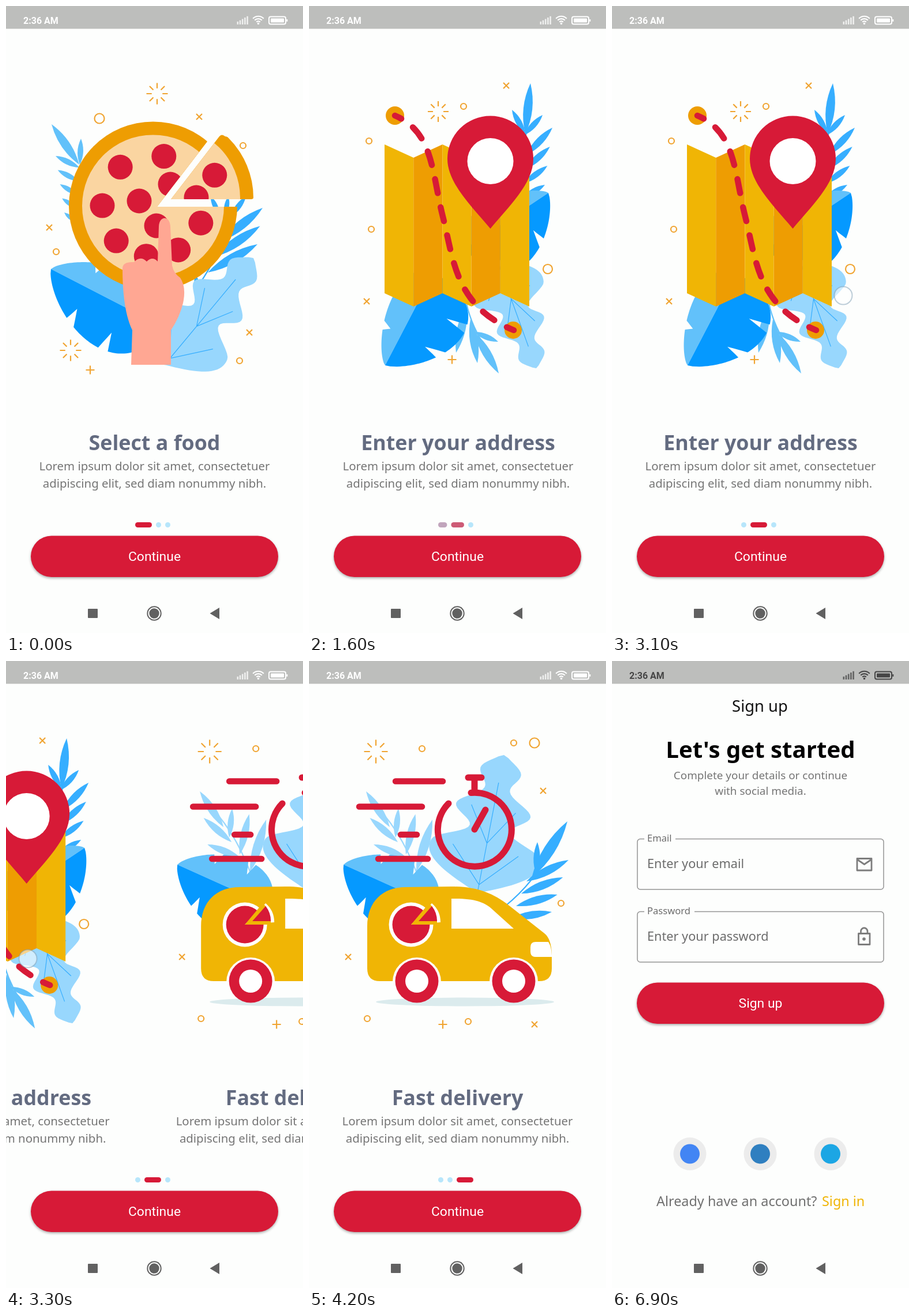
An HTML page for the animation above (7 s loop, 515 by 1087 pixels).

```html
<!DOCTYPE html>
<html lang="en">
<head>
<meta charset="utf-8">
<title>Food ordering onboarding</title>
<style>
html, body { margin: 0; width: 100%; height: 100%; overflow: hidden; background: #fdfefd; }
svg { display: block; width: 100%; height: 100%; font-family: "Noto Sans", sans-serif; }
.ui { font-family: Roboto, sans-serif; }
.btn { filter: drop-shadow(0 2px 2px #0005); }
</style>
</head>
<body>
<svg id="stage" viewBox="0 0 515 1087"></svg>
<script>
const W = 515, MID = 257.5, TAU = Math.PI * 2;
const RED = '#d71a37', YELLOW = '#f0b505', ORANGE = '#ee9d02', CREAM = '#fad5a1', SKIN = '#ffa793';
const PALE = '#98d7fd', LIGHT = '#62c1fa', BLUE = '#36aeff', DEEP = '#0599ff', MARK = '#f0a431', BG = '#fdfefd';

const clamp = v => Math.max(0, Math.min(1, v));
const lerp = (a, b, p) => a + (b - a) * p;
const times = (n, f) => Array.from({ length: n }, (_, i) => f(i));

// Basic shapes
const fill = (d, color) => `<path d="${d}" fill="${color}"/>`;
const stroke = (d, color, w = 2.2, extra = '') =>
  `<path d="${d}" fill="none" stroke="${color}" stroke-width="${w}" stroke-linejoin="round" ${extra}/>`;
const round = (d, w, extra = '') => stroke(d, RED, w, 'stroke-linecap="round" ' + extra);
const disc = (x, y, r, color) => `<circle cx="${x}" cy="${y}" r="${r}" fill="${color}"/>`;
const pill = (x, y, w, h, color, extra = '') =>
  `<rect x="${x}" y="${y}" width="${w}" height="${h}" rx="${h / 2}" fill="${color}" ${extra}/>`;
const text = (s, x, y, size, color, extra = 'text-anchor="middle"') =>
  `<text x="${x}" y="${y}" font-size="${size}" fill="${color}" ${extra}>${s}</text>`;
const heading = (s, y, size, color) => text(s, MID, y, size, color, 'text-anchor="middle" font-weight="700"');

// Small orange marks
const ring = (x, y, r = 5) => stroke(`M${x - r} ${y}a${r} ${r} 0 1 0 ${2 * r} 0a${r} ${r} 0 1 0 ${-2 * r} 0`, MARK);
const cross = (x, y) => stroke(`M${x - 5} ${y - 5}l10 10m0-10l-10 10`, MARK);
const plus = (x, y) => stroke(`M${x - 7.5} ${y}h15m-7.5-7.5v15`, MARK);
const spark = (x, y, r) => stroke(times(8, i => {
  const c = Math.cos(i * TAU / 8), s = Math.sin(i * TAU / 8);
  return `M${x + c * r / 2} ${y + s * r / 2}L${x + c * r} ${y + s * r}`;
}).join(''), MARK);

// Local frame along the line a-b: s runs from 0 to 1, w is the sideways offset
const axis = (a, b) => {
  const dx = b[0] - a[0], dy = b[1] - a[1], len = Math.hypot(dx, dy);
  return { len, at: (s, w) => [a[0] + dx * s - dy / len * w, a[1] + dy * s + dx / len * w] };
};

// Slim leaf given as tip x, y and base x, y
const leaf = ([x1, y1, x2, y2], color) => {
  const { len, at } = axis([x1, y1], [x2, y2]), w = 4 + len * .13;
  return fill(`M${x1} ${y1}Q${at(.5, w)} ${x2} ${y2}Q${at(.5, -w)} ${x1} ${y1}`, color);
};
// Row of slim leaves between the first and the last
const fan = (n, first, last, color) =>
  times(n, i => leaf(first.map((v, k) => lerp(v, last[k], i / (n - 1))), color)).join('');

// One half of a broad leaf, slit at each third
const halfLeaf = (tip, base, width, color) => {
  const { at } = axis(tip, base), n = 72;
  return fill('M' + times(n + 1, i => {
    const s = i / n, slit = Math.max(0, 1 - Math.abs(s * 3 - Math.round(s * 3)) * 8);
    const cut = s > .2 && s < .8 ? 1 - .4 * slit : 1;
    return at(s, width * 2.4 * s ** .75 * (1 - s) ** .45 * cut);
  }).join('L') + 'Z', color);
};
const broadLeaf = (tip, base, dark, light) => halfLeaf(tip, base, light, LIGHT) + halfLeaf(tip, base, dark, DEEP);

// Leaf with three rounded lobes per side, narrowing to the tip
const oakLeaf = (base, tip, wide) => {
  const { len, at } = axis(base, tip), n = 60;
  const half = s => {
    const lobes = s < .32 ? Math.sin(s / .32 * TAU / 4) : .72 + .28 * Math.cos(TAU * (s - .32) / .29);
    const cap = s > .88 ? Math.sqrt(Math.max(0, 1 - ((s - .88) / .12) ** 2)) : 1;
    return len * wide * (.53 - .43 * s) * lobes * cap;
  };
  const side = k => times(n + 1, i => at(i / n, k * half(i / n)));
  const veins = [.06, .36].map(s => `M${at(s + .25, half(s + .25) * .6)}L${at(s, 0)}L${at(s + .25, -half(s + .25) * .6)}`);
  return fill('M' + [...side(1), ...side(-1).reverse()].join('L') + 'Z', PALE)
    + stroke(`M${base}L${at(.8, 0)}` + veins.join(''), BLUE, 1.2);
};

const page = (i, title, art) => `<g transform="translate(${i * W})">${art}
  ${heading(title, 770, 35.8, '#636b80')}
  ${text('Lorem ipsum dolor sit amet, consectetuer', MID, 805, 20.4, '#757575')}
  ${text('adipiscing elit, sed diam nonummy nibh.', MID, 835, 20.4, '#757575')}</g>`;

const button = (y, label) => pill(43, y, 429, 71.5, RED, 'class="btn"')
  + text(label, MID, y + 43.5, 22.9, '#fff', 'text-anchor="middle" class="ui"');

function pizzaArt() {
  const cx = 255, cy = 346.5;
  const outer = times(8, i => {
    const a = (-80 - 45 * i - 10 * Math.sin((i - .3) * TAU / 8)) * TAU / 360;
    return [cx + 88 * Math.cos(a), cy + 88 * Math.sin(a)];
  });
  const pizza = (id, cut, inner) => `<clipPath id="${id}"><path d="${cut}"/></clipPath><g clip-path="url(#${id})">`
    + disc(cx, cy, 146, ORANGE) + disc(cx, cy, 123, CREAM)
    + [...outer, ...inner].map(([x, y]) => disc(x, y, 21.5, RED)).join('') + '</g>';
  return spark(262, 152, 18.5) + spark(112, 597, 18.5)
    + ring(162, 195, 8.5) + ring(411, 242) + ring(87, 426) + ring(405, 615)
    + cross(335, 192) + cross(75, 384) + cross(422, 566) + plus(146, 631)
    + leaf([79, 205, 127, 275], LIGHT) + leaf([130, 230, 128, 275], LIGHT)
    + fan(5, [86, 260, 127, 280], [101, 358, 120, 374], LIGHT)
    + fan(3, [445, 350, 372, 408], [436, 413, 350, 462], BLUE) + fan(3, [355, 330, 370, 362], [416, 330, 390, 365], BLUE)
    + leaf([335, 502, 328, 465], BLUE) + stroke('M395 350Q385 410 330 490', BLUE)
    + broadLeaf([78, 456], [270, 555], 77, -55)
    + oakLeaf([275, 622], [429, 437], .82)
    + pizza('pie', 'M262 348L349 235L300 150H50V550H450L402 348Z', [[231, 338], [261, 381], [285, 309]])
    + `<g transform="translate(28 -14)">${pizza('slice', 'M258 349L342 240Q346 235 352 240L440 260L401 346Q401 349 397 349Z', [[302, 346]])}</g>`
    + fill('M217 622L219 562C206 535 202 495 202 455Q202 443 222 444Q233 432 244 443Q254 433 263 443L265 382C266 363 284 363 285 382L288 450Q291 464 302 471Q313 487 307 515Q301 540 286 562V622Z', SKIN);
}

function mapArt() {
  const panels = times(5, i => {
    const x = 130 + i * 50.2, a = i % 2 * 23, b = 23 - a;
    return fill(`M${x} ${240 + a}l50.2 ${b - a}V${498 + b}l-50.2 ${a - b}Z`, i % 2 ? ORANGE : YELLOW);
  }).join('');
  return spark(223, 183, 18) + ring(267, 174) + ring(103, 234) + ring(107, 387) + ring(413, 456, 8)
    + cross(341, 138) + cross(99, 512) + plus(247, 613)
    + leaf([383, 134, 374, 222], BLUE) + leaf([351, 180, 374, 222], BLUE) + leaf([404, 189, 372, 224], BLUE)
    + fan(4, [421, 211, 376, 258], [408, 310, 370, 332], BLUE) + stroke('M380 160Q374 220 370 330', BLUE)
    + broadLeaf([414, 324], [270, 420], -75, 40)
    + fan(3, [254, 601, 272, 520], [328, 637, 286, 566], LIGHT) + leaf([327, 582, 285, 565], LIGHT)
    + stroke('M272 515Q280 555 310 600', LIGHT)
    + broadLeaf([131, 623], [215, 462], 88, -40)
    + oakLeaf([325, 440], [393, 628], .8)
    + panels + disc(148, 190, 16, ORANGE) + disc(353, 562, 15, ORANGE)
    + round('M148 190C215 218 212 290 231 365S252 520 354 562', 10.5, 'stroke-dasharray="24.7 25" stroke-dashoffset="12.5"')
    + fill('M313.5 386C283 349 239 308 239 265A74.5 74.5 0 0 1 388 265C388 308 344 349 313.5 386Z', RED)
    + disc(313.5, 269, 40, '#fff');
}

function vanArt() {
  const wheel = x => fill(`M${x - 42} 556a42 42 0 0 1 84 0Z`, BG) + disc(x, 555, 37.5, RED) + disc(x, 555, 20, '#fff');
  return spark(116, 157, 20.5) + ring(196, 152) + ring(355, 142) + ring(391, 142, 8.5) + ring(437, 420) + ring(101, 620) + ring(276, 625)
    + cross(406, 225) + cross(68, 513) + cross(391, 630) + plus(232, 630)
    + fan(3, [99, 226, 140, 288], [112, 318, 168, 340], PALE) + fan(3, [155, 256, 150, 306], [214, 275, 186, 365], PALE)
    + stroke('M115 250Q165 300 195 390', PALE)
    + oakLeaf([292, 402], [338, 163], 1)
    + leaf([448, 278, 386, 376], BLUE) + leaf([396, 314, 394, 370], BLUE)
    + fan(4, [450, 345, 377, 382], [421, 435, 350, 446], BLUE) + stroke('M425 320Q390 385 340 425', BLUE)
    + broadLeaf([60, 353], [220, 425], 68, -52)
    + round('M150 208.5H232M87 252.5H196M159 301H187M120 343H206', 10.5)
    + round('M242 247A64 64 0 1 0 281 228.5M287 203V228M276 202H299M287 292L306 258', 11)
    + '<ellipse cx="270.5" cy="591" rx="154.5" ry="7.5" fill="#dbebed"/>'
    + fill('M101 533V460C101 417 128 392 168 392L248 391C290 391 319 402 347 424L408 472Q421 482 421 512V533Q421 555 399 555H123Q101 555 101 533Z', YELLOW)
    + fill('M247 412C285 411 304 418 315 428L355 464H247Z', '#fff')
    + fill('M393 487H415Q421 496 421 513H393Q384 513 384 504V496Q384 487 393 487Z', '#fff')
    + wheel(187) + wheel(355)
    + disc(177, 457, 38.5, '#fff') + disc(177, 457, 32.5, RED)
    + fill('M177 457L213 420Q228 433 228 453Z', '#fff')
    + fill('M177 457L208 420L214 426L222 450V457Z', YELLOW)
    + fill('M190 451L213 425Q222 436 222 451Z', RED);
}

function signUp() {
  const grey = '#757575', icon = '#7d7d7d', left = '';
  const field = (y, label, hint, gap) => `<rect x="44" y="${y}" width="427" height="87.5" rx="5" fill="none" stroke="#949494" stroke-width="1.5"/>
    <rect x="56" y="${y - 3}" width="${gap}" height="6" fill="${BG}"/>
    ${text(label, 61, y + 4.5, 16.6, '#6c6c6c', left)}${text(hint, 61, y + 50, 21.7, '#6c6c6c', left)}`;
  return `<rect y="39.5" width="515" height="985" fill="${BG}"/>`
    + text('Sign up', MID - 1, 88, 27.4, '#111') + heading("Let's get started", 168, 40.2, '#000')
    + text('Complete your details or continue', MID, 205, 18.9, grey) + text('with social media.', MID, 232, 18.9, grey)
    + field(308.5, 'Email', 'Enter your email', 54) + field(434.5, 'Password', 'Enter your password', 87)
    + stroke('M425 342.5h25v20.5h-25ZM425 344l12.5 8.5L450 344', icon, 2.8)
    + stroke('M427.5 472.5h19.5v19h-19.5ZM431.5 472v-3.5a5.7 5.7 0 0 1 11.5 0v3.5', icon, 2.8)
    + disc(437, 482, 2.8, icon) + button(557.5, 'Sign up')
    + ['#4285f4', '#2f7fc0', '#1ca6e4'].map((c, i) => disc(135 + i * 122, 854.5, 28.5, '#ececec') + disc(135 + i * 122, 854.5, 17, c)).join('')
    + text('Already have an account?', 77, 945, 23.4, '#707070', left) + text('Sign in', 364, 945, 23.4, YELLOW, left);
}

function statusBar() {
  const ink = 'currentColor';
  const bars = times(5, i => `M${401.8 + i * 4.2} 32v${-5 - i * 2.3}`).join('');
  const waves = times(3, i => {
    const r = 4.5 + i * 4.2, k = r * .72;
    return `M${437.5 - k} ${31 - k}a${r} ${r} 0 0 1 ${2 * k} 0`;
  }).join('');
  return `<rect width="515" height="39.5" fill="#bdbebc"/><g id="status">`
    + text('2:36 AM', 30, 31, 16, ink, 'class="ui" font-weight="700"')
    + stroke(bars, ink, 2.6, 'opacity=".75"') + stroke(waves, ink) + disc(437.5, 30.5, 1.8, ink)
    + `<rect x="456" y="18.5" width="29" height="13" rx="3" fill="none" stroke="${ink}" stroke-width="2"/>`
    + `<rect x="459" y="21.5" width="23" height="7" rx="1" fill="${ink}"/>` + stroke('M487.3 23v4', ink, 2) + '</g>';
}

const navBar = '<rect x="142" y="1045" width="17" height="16" rx="1" fill="#616161"/>'
  + disc(257, 1053, 12.7, '#616161') + disc(257, 1053, 10.7, BG) + disc(257, 1053, 8.7, '#616161')
  + fill('M353.5 1053l16.5-10v20Z', '#616161');

const $ = id => document.getElementById(id);
$('stage').innerHTML = `<rect width="515" height="1087" fill="${BG}"/>
  <g id="pages">${page(0, 'Select a food', pizzaArt())}${page(1, 'Enter your address', mapArt())}${page(2, 'Fast delivery', vanArt())}</g>
  <g id="dots">${pill(0, 895, 9, 9, PALE).repeat(3)}</g>${button(918.5, 'Continue')}
  ${pill(43, 918.5, 429, 71.5, '#fff', 'id="press"')}
  <circle id="touch" r="15.5" fill="#fff" fill-opacity=".55" stroke="#7f9db3" stroke-opacity=".5" stroke-width="2"/>
  <g id="signup">${signUp()}</g>${statusBar()}${navBar}`;

const mix = (a, b, p) => `rgb(${a.map((v, i) => Math.round(lerp(v, b[i], p)))})`;
const smooth = u => u * u * (3 - 2 * u);
const swipes = [{ start: 1300, time: 308 }, { start: 3100, time: 380 }];

function draw(now) {
  const t = Math.floor(now % 7000 / 100) * 100;
  const pos = swipes.reduce((sum, { start, time }) => sum + smooth(clamp((t - start) / time)), 0);
  $('pages').setAttribute('transform', `translate(${-pos * W})`);

  // The active dot moves on once a swipe is past its middle
  const [a, b] = swipes.map(({ start, time }) => clamp((t - start - time / 2 - 10) / 200));
  let x = 224;
  [1 - a, a - b, b].forEach((on, i) => {
    const dot = $('dots').children[i], w = 9 + 20 * on;
    dot.setAttribute('x', x);
    dot.setAttribute('width', w);
    dot.setAttribute('fill', mix([183, 230, 251], [215, 26, 55], on));
    x += w + 7;
  });

  const held = swipes.map(s => t - s.start).find(dt => dt >= 0 && dt <= 200);
  $('touch').style.display = held === undefined ? 'none' : '';
  if (held !== undefined) $('touch').setAttribute('transform', `translate(${401 - held * 1.815} ${502 + held * .07})`);
  $('press').setAttribute('opacity', t === 6300 || t === 6400 ? .12 : 0);

  const fade = clamp((t - 6350) / 250);
  $('signup').setAttribute('opacity', fade);
  $('status').style.color = mix([255, 255, 255], [70, 70, 70], fade);
  requestAnimationFrame(draw);
}
requestAnimationFrame(draw);
</script>
</body>
</html>
```
